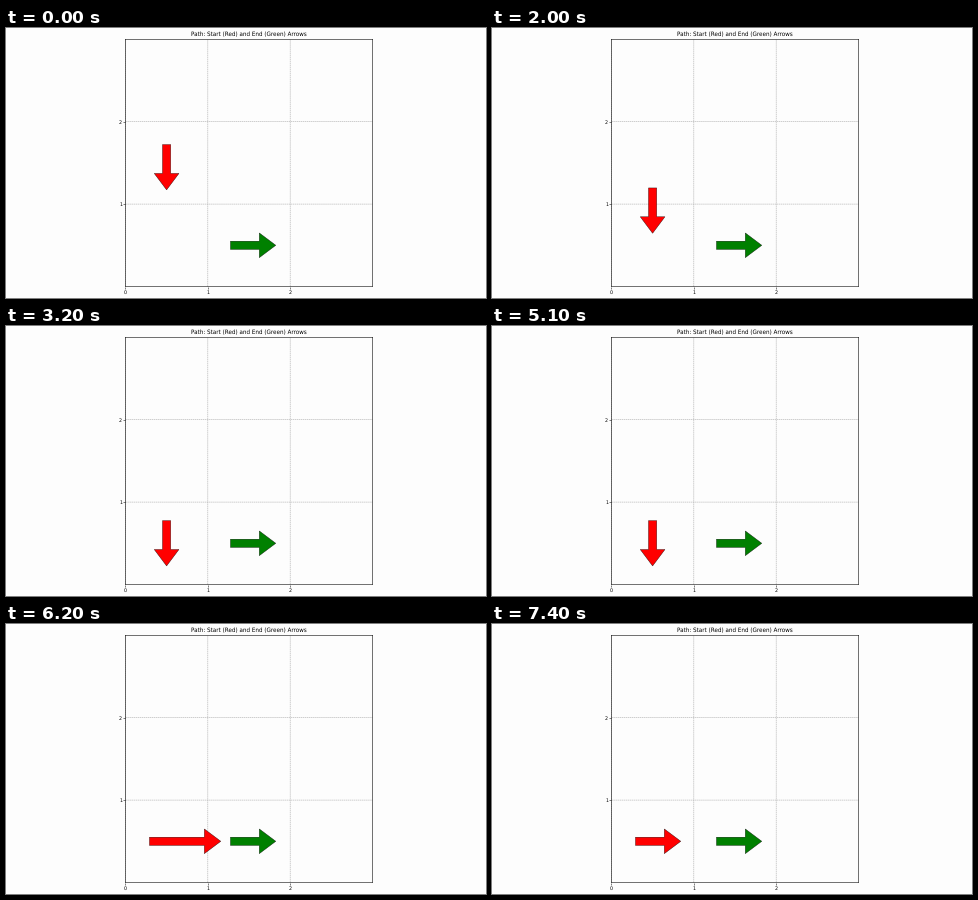
A matplotlib script for the animation above (8 s loop, 480 by 270 pixels).

```python
import numpy as np
import matplotlib.pyplot as plt
from matplotlib.animation import FuncAnimation
from matplotlib.lines import Line2D
from matplotlib.patches import Polygon

W, H, DPI = 480, 270, 100
STEP = 100                 # ms per frame
FRAMES = 80
PT = 72 / DPI              # one pixel in points
SCALE = 0.339              # shrink of the default point sizes
HEAD = 0.2

plt.rcParams["font.family"] = "DejaVu Sans"
plt.rcParams["text.hinting"] = "none"

fig = plt.figure(figsize=(W / DPI, H / DPI), dpi=DPI, facecolor="#fdfdfd")
ax = fig.add_axes([119.4 / W, 11.5 / H, 247.2 / W, 247.2 / H], facecolor="#fdfdfd")
ax.set(xlim=(0, 3), ylim=(0, 3), xticks=range(3), yticks=[1, 2])
ax.set_title("Path: Start (Red) and End (Green) Arrows",
             fontsize=12 * SCALE, pad=6 * SCALE)
ax.tick_params(labelsize=10 * SCALE, length=3.5 * SCALE, pad=3.5 * SCALE,
               width=0.5 * PT)
ax.set_axisbelow(True)
ax.grid(color="#b0b0b0", linewidth=0.6 * PT, linestyle=(0, (2.4, 1)), snap=False)
for spine in ax.spines.values():
    spine.set(linewidth=0.55 * PT, snap=False)

# thin line along the right border of the stage
fig.add_artist(Line2D([479.5 / W] * 2, [0, 1], color="#404040", linewidth=PT))


def arrow_points(tail, tip):
    """Outline of a block arrow between two points."""
    tail, tip = np.array(tail), np.array(tip)
    along = (tip - tail) / np.hypot(*(tip - tail))
    side = np.array([-along[1], along[0]])
    neck = tip - HEAD * along
    return [tail + 0.05 * side, neck + 0.05 * side, neck + 0.15 * side, tip,
            neck - 0.15 * side, neck - 0.05 * side, tail - 0.05 * side]


def add_arrow(color, tail, tip):
    patch = Polygon(arrow_points(tail, tip), closed=True, facecolor=color,
                    edgecolor="black", linewidth=0.35 * PT, joinstyle="miter",
                    snap=False)
    return ax.add_patch(patch)


def red_pose(t):
    """Slide down one cell, wait, turn right while stretched, then shrink."""
    y = 1.5 - np.clip((t - 900) / STEP, 1, 19) / 19
    phi = np.pi / 2 * np.clip((t - 5200) / 900, 0, 1)
    stretch = np.clip((6800 - t) / 1900, 0, 1)
    rise = 0.275 * np.cos(phi)
    back = 0.208 * np.sin(phi) + 0.29 * np.sin(2 * phi)
    reach = (0.342 + stretch) * np.sin(phi)
    return (0.5 - back, y + rise), (0.5 + reach, y - rise)


add_arrow("green", (1.275, 0.5), (1.825, 0.5))
red = add_arrow("red", *red_pose(0))


def update(i):
    red.set_xy(arrow_points(*red_pose(i * STEP)))
    return [red]


anim = FuncAnimation(fig, update, frames=FRAMES, interval=STEP,
                     repeat=True, repeat_delay=0)
plt.show()
```
